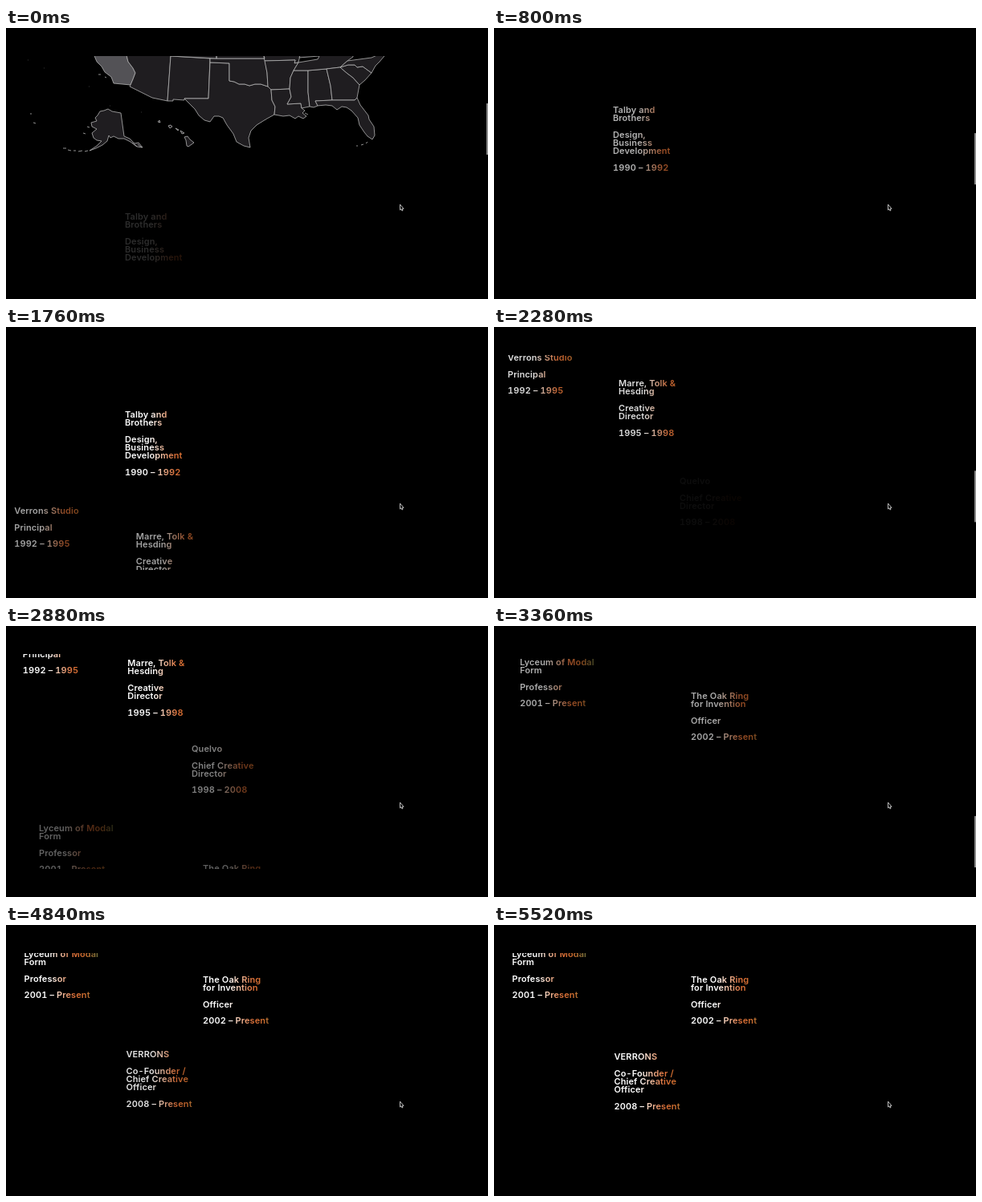
Recreate the animation shown at these times as an HTML page. Size 600x338 px, loop 5560 ms.

```html
<!DOCTYPE html>
<html lang="en">
<head>
<meta charset="utf-8">
<title>Career timeline</title>
<style>
  html, body { margin: 0; width: 100%; height: 100%; overflow: hidden; background: #000; }
  #view { position: absolute; left: 0; top: 34.5px; width: 600px; height: 268.5px; overflow: hidden; }
  #page { position: absolute; left: 0; top: -34.5px; width: 600px; height: 338px; }
  #map { position: absolute; left: 0; top: 0; overflow: visible; fill: #1f1d20; stroke: #b4b4b4; stroke-width: .8; stroke-linejoin: round; }
  .job {
    position: absolute; left: 0; top: 0; width: 110px; white-space: pre;
    font: 600 11px/10.25px Inter, sans-serif; font-variant-numeric: tabular-nums; letter-spacing: .1px; color: transparent;
    background: linear-gradient(90deg, #fff 32px, #f2c0a4 46px, #de7038 62px, #cc6c2e 76px, #7c7038 90px, #3c6a5a 108px);
    -webkit-background-clip: text; background-clip: text;
  }
  #thumb { position: absolute; left: 598.4px; top: 0; width: 2px; height: 64px; background: #8c8c8c; }
  #cursor { position: absolute; left: 489px; top: 219px; fill: #000; stroke: #ccc; stroke-width: .9; }
</style>
</head>
<body>
<div id="view"><div id="page">
  <svg id="map" width="600" height="338">
    <path fill="#535256" d="M108 30L113 42 119 48 123 55 131 61 134 69 155 71 158 64 161 56 158 50 152 42 149 30Z"/>
    <path d="M149 30L152 42 158 50 161 56 158 64 155 71 154 73 182 87 201 91 205 35 205 30Z"/>
    <path d="M205 35L254 38 252 88 222 88 222 90 208 89 208 91 201 91Z"/>
    <path d="M254 43L278 44 278 66 284 67 290 70 297 70 303 72 310 70 317 70 329 74 330 77 331 90 335 98 334 108 325 113 320 116 312 121 305 128 302 137 304 149 296 147 287 142 283 132 275 121 270 112 265 110 259 110 254 117 247 115 240 109 235 101 222 88 252 88Z"/>
    <path d="M254 38L322 38 325 56 326 73 317 70 310 70 303 72 297 70 290 70 284 67 278 66 278 44 254 43Z"/>
    <path d="M205 35L205 30 262 30 262 38ZM262 38V30H320L322 38ZM320 30L322 41 360 40 359 44 364 43 367 30Z"/>
    <path d="M322 41L360 40 359 44 364 43 358 53 354 62 353 76 330 77 326 73 325 56Z"/>
    <path d="M330 77L353 76 355 86 350 95 367 94 368 100 372 103 369 106 374 110 370 113 364 110 360 113 353 109 345 110 334 108 335 98 331 90Z"/>
    <path d="M358 53L376 53 376 80 378 98 368 100 367 94 350 95 355 86 353 76 354 62Z"/>
    <path d="M376 53L399 51 404 72 406 90 385 91 388 97 383 99 378 98 376 80Z"/>
    <path d="M364 43L358 53 376 53 399 51 416 49 425 41 432 36 432 30 367 30 365 37 390 35 388 39Z"/>
    <path d="M399 51L416 49 424 56 432 62 440 71 437 87 434 90 406 90 404 72Z"/>
    <path d="M416 49L426 46 434 46 437 49 444 48 455 56 447 65 440 71 432 62 424 56Z"/>
    <path d="M416 49L425 41 455 37 471 30 471 35 465 42 460 47 455 56 444 48 437 49 434 46 426 46Z"/>
    <path d="M385 91L406 90 434 90 437 87 441 96 451 109 452 114 458 123 459 134 456 139 450 135 446 130 440 121 438 112 430 103 424 99 418 98 412 102 406 97 398 96 388 97Z"/>
    <path d="M117 104L122 103 127 101 132 104 143 106 147 135 154 138 160 144 165 143 170 149 163 148 155 142 147 138 140 138 134 135 130 137 128 134 126 141 120 146 112 150 104 153 113 147 119 141 113 140 109 137 107 131 113 126 107 123 106 118 113 116 111 112 114 109Z"/>
    <path d="M222 136L226 135 229 139 234 143 227 148 225 147 224 140ZM202 122L205 121 207 123 204 125ZM211 125L215 127 214 128ZM217 128L222 131 219 132ZM189 117L191 115 192 118Z"/>
    <path fill="none" d="M71 150h4M77 152l4 1M84 153h3M90 154l5-1M98 154l4-1M101 123l3 1M96 131l3 1M157 143l6 5M164 145l5 4M115 58h3M123 61l2 1M31 106v2M34 118l3 1M436 147h2M442 146l3-1M448 144l2-2M372 106l4 2"/>
    <path fill="none" stroke="#444" d="M27 40h1M47 50h1M103 73h1M129 97h1M168 105h1"/>
  </svg>
</div></div>
<div id="thumb"></div>
<svg id="cursor" width="8" height="11"><path d="M1.5 1V8L3 6.8 4 9 5 8.5 4.2 6.4H6Z"/></svg>
<script>
const LOOP = 5560, REVEAL = 2200, DRIFT = 30;
const page = document.getElementById('page');
const map = document.getElementById('map');
const thumb = document.getElementById('thumb');

// x, y: resting place on the page; dx, dy: side it drifts in from; start: reveal time
const jobs = [
  [148, 259.5, 0, -1, -200, 'Talby and\nBrothers\n\nDesign,\nBusiness\nDevelopment\n\n1990 – 1992'],
  [21, 379.5, -1, 0, 880, 'Verrons Studio\n\nPrincipal\n\n1992 – 1995'],
  [151, 411.5, 1, 0, 880, 'Marre, Tolk &\nHesding\n\nCreative\nDirector\n\n1995 – 1998'],
  [231, 504.5, 0, 1, 2230, 'Quelvo\n\nChief Creative\nDirector\n\n1998 – 2008'],
  [22.5, 617.5, 1, 0, 2410, 'Lyceum of Modal\nForm\n\nProfessor\n\n2001 – Present'],
  [245, 649.5, 0, 1, 2430, 'The Oak Ring\nfor Invention\n\nOfficer\n\n2002 – Present'],
  [149.5, 746, 0, -1, 3375, 'VERRONS\n\nCo-Founder /\nChief Creative\nOfficer\n\n2008 – Present'],
].map(([x, y, dx, dy, start, text]) => {
  const el = document.createElement('div');
  el.className = 'job';
  el.textContent = text;
  page.append(el);
  return { el, x, y, dx, dy, start };
});

const ramp = (t, a, b) => Math.min(1, Math.max(0, (t - a) / (b - a)));
const smooth = (t, a, b) => { const u = ramp(t, a, b); return u * u * (3 - 2 * u); };
const scrollAt = t => 150 * smooth(t, 0, 850) + 216 * smooth(t, 1760, 2420) + 216 * smooth(t, 2890, 3430);
const thumbAlpha = t => 1 - ramp(t, 1250, 1450) + ramp(t, 1770, 1850) - ramp(t, 2550, 2750)
  + ramp(t, 2900, 2960) - ramp(t, 3900, 4060);

function draw(now) {
  const t = now % LOOP, scroll = scrollAt(t);
  map.style.transform = `translateY(${-scroll}px)`;
  for (const { el, x, y, dx, dy, start } of jobs) {
    const left = (1 - ramp(t, start, start + REVEAL)) ** 2;
    const px = x + dx * DRIFT * left, py = y - 5 - scroll + dy * DRIFT * left;
    el.style.transform = `translate(${px}px, ${py}px)`;
    el.style.opacity = 1 - left;
  }
  thumb.style.transform = `translateY(${94 + scroll / 4}px)`;
  thumb.style.opacity = thumbAlpha(t);
}

const begin = performance.now();
function tick() {
  draw(performance.now() - begin);
  requestAnimationFrame(tick);
}
tick();
</script>
</body>
</html>
```
